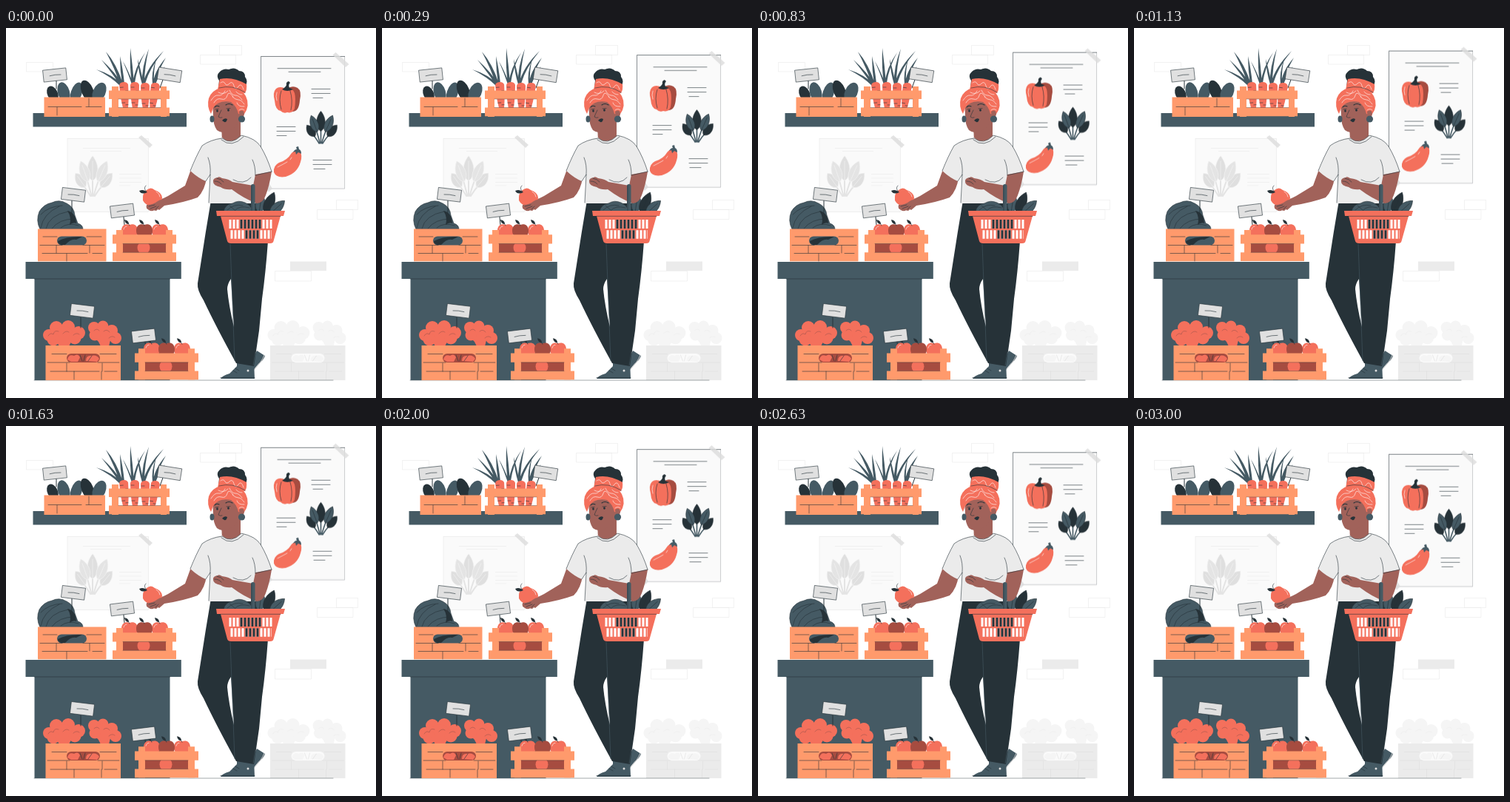
An HTML page for the animation above (3040 ms loop, 500 by 500 pixels).

```html
<!DOCTYPE html>
<html lang="en">
<head>
<meta charset="utf-8">
<title>Grocery shopping</title>
<style>
  html, body { margin: 0; width: 100%; height: 100%; overflow: hidden; background: #fff; }
  svg { display: block; width: 100vw; height: 100vh; stroke-width: .6px; }
  .ink { fill: #263238; }
  .slate { fill: #455a64; }
  .coral { fill: #f4705c; }
  .brick { fill: #a64c40; }
  .wood { fill: #ff9a6c; }
  .skin { fill: #a1625a; }
  .line { fill: none; stroke: #263238; stroke-linecap: round; stroke-linejoin: round; }
  .pale { fill: none; stroke: #e9e9e9; }
  .white { fill: none; stroke: #fff; stroke-linecap: round; }
  .tape { fill: #dcdcdc; opacity: .8; }
  .plant { fill: var(--leaf, #455a64); stroke: var(--vein, #263238); }
  .back { fill: var(--back, #263238); }
  .box { fill: var(--box, #ff9a6c); }
  .floret { fill: var(--floret, #f4705c); }
  .grain { fill: none; stroke: var(--grain, #263238); stroke-linecap: round; }
  .hole { fill: var(--hole, #a64c40); }
  .faded { --box: #ebebeb; --floret: #f5f5f5; --grain: #dedede; --hole: #fafafa; }
  .ghost { --leaf: #e4e4e4; --back: #dfdfdf; --vein: #f2f2f2; }
  #poster { animation: float 3040ms linear infinite; }
  @keyframes float { 50% { transform: translateY(-10px); } }
</style>
</head>
<body>
<svg viewBox="0 0 500 500">
  <defs>
    <g id="sign">
      <rect x="-15.700" y="-8" width="31.400" height="16" fill="#e0e0e0" stroke="#263238"/>
      <path class="line" d="M-7 .5Q0-.8 8 .3"/>
    </g>
    <path id="leaf" d="M0 0C-8-4-9-16 0-25C9-16 8-4 0 0ZM0 0V-20"/>
    <g id="spinach" class="plant">
      <path fill="none" style="stroke: var(--leaf, #455a64)" stroke-width="1.600" d="M0-1L0-20M-1-1Q-4-12-6-19M1-1Q4-12 7-19M-2-1Q-7-9-11-14M2-1Q7-9 12-14"/>
      <g class="back">
        <use href="#leaf" transform="translate(-8 -11) rotate(-36) scale(.85 .75)"/>
        <use href="#leaf" transform="translate(9 -11) rotate(40) scale(.85 .8)"/>
        <use href="#leaf" transform="translate(0 -18) scale(.9 1.08)"/>
      </g>
      <use href="#leaf" transform="translate(-5 -17) rotate(-20) scale(.85 .95)"/>
      <use href="#leaf" transform="translate(6 -17) rotate(24) scale(.85 .98)"/>
    </g>
    <g id="apple">
      <path d="M0-9C-4-11-11-10-11-1C-11 7-4 10 0 9C5 10 11 7 11-1C11-10 4-11 0-9Z"/>
      <path class="line" d="M0-8Q-1-12-5-14"/>
      <path class="ink" d="M-1-10Q-6-10-7-16Q-1-15-1-10Z"/>
    </g>
    <g id="apples">
      <rect class="brick" x="158" y="289" width="58" height="15"/>
      <use href="#apple" class="coral" x="167" y="275"/>
      <use href="#apple" class="coral" x="208" y="275"/>
      <use href="#apple" class="brick" x="187" y="275"/>
      <ellipse class="coral" cx="186" cy="297" rx="8.500" ry="9"/>
      <path class="white" d="M159 272Q160 268 163 268M200 272Q201 268 204 268"/>
      <g class="wood">
        <path d="M149 273h9v42h-9zM216 273h9v42h-9z"/>
        <path d="M144 279.300h86v12.200h-86zM144 303.300h86v11.700h-86z"/>
      </g>
      <path class="line" d="M158 291.500H216M158 303.300H216" opacity=".6"/>
    </g>
    <g id="florets" class="floret">
      <circle cx="58" cy="415" r="8"/><circle cx="68" cy="405" r="9"/><circle cx="84" cy="404" r="9"/>
      <circle cx="98" cy="412" r="9"/><circle cx="78" cy="416" r="13"/><circle cx="64" cy="421" r="8.500"/>
      <circle cx="93" cy="419" r="8.500"/>
      <circle cx="119" cy="405" r="8"/><circle cx="131" cy="403" r="7.500"/><circle cx="143" cy="409" r="8"/>
      <circle cx="148" cy="419" r="8"/><circle cx="132" cy="414" r="12"/><circle cx="120" cy="415" r="7.500"/>
      <path d="M66 420h24l-5 10H72zM122 418h20l-3 12H128z"/>
    </g>
    <g id="cauliflowers">
      <use href="#florets"/>
      <path class="grain" opacity=".4" d="M57 416q3-5 7-2q1-6 7-4M77 413q4-5 8-2M91 415q4-4 8-1M119 409q4-4 7 0M132 410q4-4 8 1M139 419q4-4 8-1"/>
      <rect class="box" x="53.500" y="429" width="101.500" height="47"/>
      <rect class="hole" x="82" y="440" width="45" height="12" rx="6"/>
      <path class="floret" d="M83 448q2-8 9-5q5-4 8 2l-3 6H88zM108 450q0-8 7-7q8-2 11 4l-3 4z"/>
      <path class="grain" d="M62 440.500H82M127 440.500H149M56 452H86M124 452H153M60 464H126M133 464H150M82 453V464M130 453V464M92 464V475M129 464V475M100 442l3 8M107 442l-2 8M116 443l-5 7"/>
    </g>
    <g id="carrot">
      <path class="coral" d="M-6 1Q-5-3 0-3Q5-3 6 1Q6 24 2 42H-1Q-6 22-6 1Z"/>
      <path class="line" d="M-5 4h4M2 9h3M-4 25h4M1 28h3"/>
    </g>
  </defs>

  <rect width="500" height="500" fill="#fff"/>

  <!-- Wall bricks -->
  <g class="pale">
    <path d="M27.500 46.500h36v12.500h-36zM288.500 23.500h30v13h-30zM262.500 36.500h48v12.500h-48zM363.500 328.500h49v13.500h-49zM446.500 232.500h29v13h-29zM420.500 245.500h48.500v13h-48.500z"/>
    <path fill="#ebebeb" stroke="none" d="M384 315.500h49v12.500h-49z"/>
  </g>

  <!-- Faded poster -->
  <g class="ghost">
    <rect x="83" y="149.500" width="109.500" height="99" fill="#fafafa" stroke="#e6e6e6"/>
    <path class="pale" d="M104 162.500H168M114 166.500H156M153 197.500H183M153 203H183M153 208.500H183M153 213H168"/>
    <path class="tape" d="M179 148l4-3 15 13-4 4z"/>
    <use href="#spinach" transform="translate(117 229) scale(1.220 1.250)"/>
  </g>

  <!-- Floating poster -->
  <g id="poster">
    <rect x="344.400" y="38.500" width="113.200" height="178.700" fill="#fafafa"/>
    <path class="line" d="M344.400 217V38.500H457.600"/>
    <path class="line" opacity=".4" d="M344.400 217.200H457.600V38.500"/>
    <path class="line" d="M367 54.700H439M382 59.300H425M413 82.500H438M413 88.500H438M415 94.500H428M366 133.500H391M366 139.500H391M366 145.500H379M415 178.500H440M415 184.500H440M416 190.500H431"/>
    <path class="brick" d="M380 82Q387 77 394 81Q400 85 397 98Q396 112 388 113Q381 114 380 108Z"/>
    <path class="coral" d="M378 82Q370 78 365 82Q360 87 363 98Q364 111 371 112Q375 116 380 114Q387 116 390 109Q392 96 390 88Q387 80 378 82Z"/>
    <path class="line" d="M372 85Q368 97 372 110M384 85Q388 98 385 111"/>
    <path class="white" d="M366 87Q364 92 366 98"/>
    <path class="ink" d="M373 83Q378 80 379 77Q378 73 382 72L384 74Q381 77 383 81L388 83Q380 87 373 83Z"/>
    <use href="#spinach" transform="translate(425.500 157.500)"/>
    <path class="coral" d="M386 169Q392 163 397 167Q401 172 398 181Q394 196 378 201Q365 203 362 195Q361 186 369 182Q380 179 386 169Z"/>
    <path class="white" d="M367 188Q375 184 380 181M384 178L386 175"/>
    <path class="slate" d="M388 168Q390 164 393 164L392 161L395 160L396 164Q399 165 399 170L395 168L392 171L391 167Z"/>
    <path class="tape" d="M441.500 36.500l4-3.500 18 16-4.500 4z"/>
    <path class="tape" d="M349 213l5-5 6 9-5 5z"/>
  </g>

  <!-- Faded crate and floor -->
  <use href="#cauliflowers" class="faded" x="303.500"/>
  <path class="line" opacity=".7" d="M38 476H442"/>

  <!-- Upper shelf -->
  <rect class="slate" x="36.500" y="115" width="207.500" height="18.500"/>
  <g>
    <ellipse class="ink" cx="63" cy="89" rx="7" ry="11" transform="rotate(-25 63 89)"/>
    <ellipse class="slate" cx="78" cy="87" rx="8" ry="14" transform="rotate(-16 78 87)"/>
    <ellipse class="slate" cx="95" cy="88" rx="7.500" ry="15" transform="rotate(18 95 88)"/>
    <ellipse class="ink" cx="110" cy="85" rx="8" ry="15" transform="rotate(-22 110 85)"/>
    <ellipse class="slate" cx="126" cy="87" rx="8.500" ry="14" transform="rotate(24 126 87)"/>
    <path class="line" stroke-width="1" d="M68 70V82"/>
    <rect class="wood" x="51.500" y="93.500" width="82.500" height="26.500"/>
    <path class="line" d="M57 106.500H102M108 106.500H129M69 107V118M112 95V106"/>
  </g>
  <g>
    <path class="slate" d="M158 75Q149 48 135 32Q147 55 154 76ZM156 76Q144 63 122 56Q142 66 154 78ZM157 76Q148 60 129 43Q145 63 154 77ZM160 75Q158 55 154 38Q154 57 157 76ZM173 74Q171 50 168 27Q167 54 170 75ZM174 74Q177 53 188 33Q174 53 171 75ZM172 75Q164 55 158 45Q165 61 170 76ZM187 75Q187 53 193 28Q183 53 184 75ZM188 75Q194 54 213 31Q191 52 185 75ZM186 75Q181 52 178 42Q179 60 184 76ZM202 75Q204 61 216 40Q199 60 199 76ZM202 76Q207 63 215 52Q203 62 199 77ZM200 75Q199 58 203 42Q196 60 198 76Z"/>
    <path class="line" stroke-width="1" d="M212 70L208 81"/>
    <use href="#carrot" transform="translate(159 76) rotate(-4)"/>
    <use href="#carrot" x="174" y="76"/>
    <use href="#carrot" x="188" y="77"/>
    <use href="#carrot" transform="translate(202 77) rotate(8)"/>
    <path class="wood" d="M143 79h9v41h-9zM209 79h8v41h-8zM139 84.500h82v11.500h-82zM139 107.500h82v11.800h-82z"/>
    <path class="line" opacity=".6" d="M152 96H209M152 107.500H209"/>
  </g>
  <use href="#sign" transform="translate(66 63.500) rotate(-6)"/>
  <use href="#sign" transform="translate(221 63.300) rotate(9)"/>

  <!-- Table -->
  <rect class="slate" x="38.500" y="338" width="183" height="138"/>
  <rect class="slate" x="26.500" y="316" width="210.300" height="23"/>
  <path class="line" d="M38.500 339H221.500"/>

  <!-- Cabbage crate -->
  <path class="slate" stroke="#263238" d="M46 272Q40 260 45 248Q51 238 62 236Q72 231 82 237Q92 242 93 253L97 264Q104 266 104 272Z"/>
  <path class="line" d="M47 270Q50 251 72 241M54 271Q58 253 84 248M62 271Q72 258 92 258M47 252Q57 241 76 240M74 270Q84 262 98 267"/>
  <path class="ink" d="M83 247Q94 249 95 264Q91 262 86 266Q89 256 83 247Z"/>
  <path class="line" stroke-width="1" d="M89 233V249"/>
  <rect class="wood" x="43" y="271.500" width="92.500" height="43.800"/>
  <rect class="slate" x="69" y="281.500" width="40" height="12" rx="6"/>
  <path class="ink" d="M70 288Q82 281 103 282L95 286Q88 284 80 293H75Q70 292 70 288Z"/>
  <path class="line" d="M50 282H69M109 282H129M46 293.500H76M104 293.500H133M49 304.500H110M117 304.500H130M68 294V304M113 294V304M82 305V315"/>
  <use href="#sign" transform="translate(91 225.300) rotate(7)"/>

  <!-- Apple and cauliflower crates -->
  <path class="line" stroke-width="1" d="M159 255L160 266M188 424L189 434"/>
  <use href="#apples"/>
  <use href="#sign" transform="translate(157 247) rotate(-7)"/>
  <use href="#cauliflowers"/>
  <path class="line" stroke-width="1" d="M101 391V405"/>
  <use href="#sign" transform="translate(103 382.300) rotate(7)"/>
  <use href="#apples" x="30" y="160.300"/>
  <use href="#sign" transform="translate(186 416) rotate(-7)"/>

  <!-- Shoes and trousers -->
  <path class="slate" d="M339 436L350 443Q348 449 341 454L332 465L331 452Z"/>
  <path d="M349 442Q346 451 333 464" fill="none" stroke="#c7c7c7" stroke-width="1"/>
  <path class="slate" d="M290 474Q292 470 302 467L312 457L312 450H335L336 474Z"/>
  <path class="line" d="M290 472.500H336M307 463l5 3M310 460l5 3"/>
  <circle cx="327" cy="463" r="1.500" fill="#e0e0e0"/>
  <path class="ink" d="M276.500 236H337L354 288Q351 330 346 366L342 409L335 457L311 453Q284 404 267 368Q258 354 259 345L270 275Z"/>
  <path fill="#fff" d="M304 339Q299 346 299 353Q301 375 308 404Z"/>
  <path d="M303 292L309 450M337 438L334 456" fill="none" stroke="#455a64"/>

  <!-- Reaching arm -->
  <path class="skin" d="M250 191L271 202Q269 219 259 229Q240 236 214 240L207 246L202 243L199 247Q193 248 190 243Q188 239 195 236L207 232Q214 230 219 227L242 213Z"/>
  <path class="coral" d="M185 233Q184 223 190 219Q196 214 201 219Q210 222 211 229Q211 236 203 239Q190 243 185 233Z"/>
  <path class="ink" d="M191 222Q183 226 180 220Q186 217 191 222Z"/>
  <path class="line" d="M190 221Q185 217 189 213"/>
  <path class="white" d="M203 221Q208 224 208 228"/>
  <path class="skin" d="M190 239Q199 239 205 234Q211 230 214 234L211 240L203 247Q197 246 190 244Z"/>
  <path class="line" d="M193 241L201 239M195 244L203 241M202 245L206 241"/>

  <!-- Neck and shirt -->
  <path class="skin" d="M291 132L317 122V149Q306 162 292 152Z"/>
  <path fill="#ebebeb" d="M292 148Q304 159 318 145Q337 149 344 160Q353 175 359 194L337 199L338 237H274L276 198L270 207Q260 203 249 193Q257 173 265 159Q276 151 292 148Z"/>
  <path class="line" d="M249 193Q257 173 265 159Q276 151 292 149Q305 159 318 145Q337 149 344 160Q353 175 359 194M291 151Q305 163 321 147M276 198Q277 185 273 175M270 207L276 198L274 236M337 199Q337 186 333 178M307 205Q321 213 331 202"/>

  <!-- Head -->
  <path class="ink" d="M288 71Q283 64 289 59Q294 54 301 56Q309 52 315 58Q323 58 323 66Q328 72 323 79L318 88L287 82Z"/>
  <path class="coral" d="M289 69Q306 65 325 76Q326 83 323 88L286 83Z"/>
  <path class="skin" d="M279 98L315 96Q320 105 316 122Q311 136 300 140Q291 143 285 138Q280 131 280 119Z"/>
  <path class="coral" d="M277 116Q271 106 274 95Q278 84 290 81Q307 78 320 86Q330 98 325 111L321 118L314 116Q312 106 304 100Q287 97 280 108Z"/>
  <path class="white" d="M290 74q4-3 6 1t6 0t6 3t6 1t7 4M277 98q5-8 10-7t9-6M281 101q4-7 10-5t8-5t8 2M287 87q7 4 13-2M302 84q3 7 8 7t9 6M306 93q4 4 8 4t8 6M312 101q2 6 10 5M315 111q4-3 7 0M311 86q3 4 8 4"/>
  <path class="line" d="M288 81Q306 76 323 87"/>
  <path class="skin" d="M315 113Q321 109 322 116Q321 123 316 123Z"/>
  <circle class="slate" cx="318.500" cy="123" r="4.600"/>
  <ellipse class="slate" cx="278.500" cy="123" rx="3" ry="4.600"/>
  <path class="line" stroke-width="1.100" d="M282 107Q284 104 288 106M297 104Q301 101 306 104"/>
  <ellipse class="ink" cx="285.500" cy="112" rx="1.300" ry="1.800"/>
  <ellipse class="ink" cx="300.500" cy="111" rx="1.400" ry="1.800"/>
  <path class="line" d="M283 110L287 109.500M298 109L303 108.500M291 111Q288 117 287 120Q289 122 292 121"/>
  <path class="ink" d="M292 125Q295 121 299 123Q298 128 295 127Z"/>

  <!-- Basket contents -->
  <path class="slate" stroke="#263238" d="M294 248Q296 238 306 237Q314 232 323 236Q332 240 333 248Z"/>
  <path class="line" d="M299 246Q308 237 320 240M309 247Q315 239 329 243M302 240L309 246"/>
  <g class="plant">
    <use href="#leaf" transform="translate(342 250) rotate(8) scale(1 1.050)"/>
    <use href="#leaf" class="back" transform="translate(350 250) rotate(24) scale(1.050 1.220)"/>
    <use href="#leaf" transform="translate(357 251) rotate(48) scale(1 1.050)"/>
  </g>

  <!-- Carrying arm -->
  <path class="skin" d="M337 198L359 194Q356 213 351 226Q347 237 339 237Q322 231 305 218Q296 219 290 215Q280 213 280 208Q279 203 286 202Q288 200 292 203Q301 204 306 208L334 213Z"/>
  <path class="line" d="M282 207Q288 207 291 211M285 203Q291 204 294 208M337 199L359 194"/>

  <!-- Basket -->
  <rect class="slate" x="331" y="211" width="5.500" height="40" rx="2.500"/>
  <path class="line" d="M332 213V247"/>
  <path class="coral" d="M284 247H377L375 254H371L361.500 288Q361 291 357 291H304Q300 291 299 288L290 254H285Z"/>
  <g fill="none" stroke="#fff" stroke-dasharray="3 2">
    <path stroke-width="12" d="M301.500 265H361"/>
    <path stroke-width="11.500" d="M303.500 279H359"/>
    <g stroke="#263238">
      <path stroke-width="12" d="M316.500 265H345"/>
      <path stroke-width="11.500" d="M323.500 279H342"/>
    </g>
  </g>
  <path class="line" d="M290 254.300H371"/>
</svg>
</body>
</html>
```
